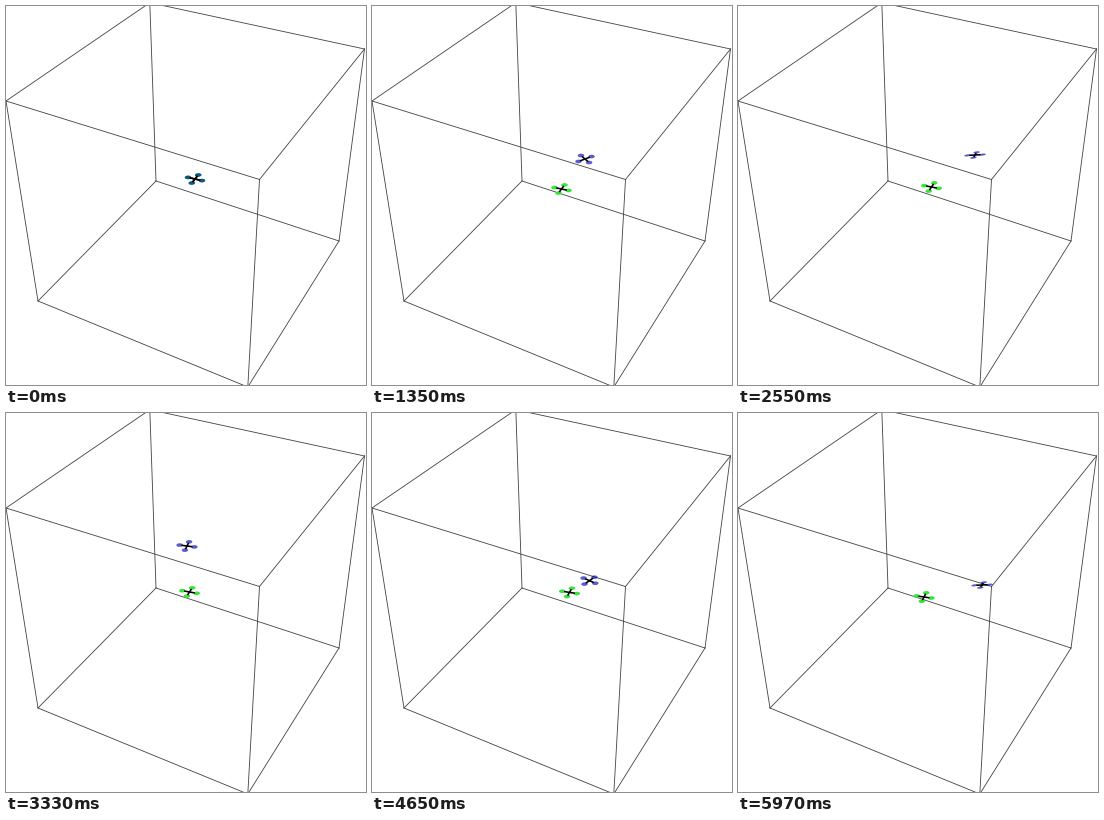
These frames come from a looping animation (360x379 px, 6000 ms). A matplotlib script:

```python
import numpy as np
import matplotlib.pyplot as plt
from matplotlib.animation import FuncAnimation
from matplotlib.patches import Polygon

W, H, DPI = 360, 379, 100
FRAMES, STEP = 200, 30

# Cube corners in stage pixels, both rings in the same order
TOP = [(143.8, -3.3), (358.5, 43), (253.5, 173.5), (0, 95)]
BOTTOM = [(150, 175), (333, 235), (241.8, 381), (32, 295)]

# Turning points of the flights: time (s), x, y
BLUE_PATH = [
    (0, 189, 173), (.63, 218, 174), (.9, 225, 165), (1.35, 213, 153),
    (1.87, 166, 144), (2.08, 178, 133), (2.55, 237, 149), (3.12, 168, 121),
    (3.33, 181, 133), (3.8, 211, 155), (4.11, 197, 163), (5.13, 241, 169),
    (5.55, 236, 173), (5.97, 244, 172)]
GREEN_PATH = [
    (0, 189, 173), (.6, 190, 183), (1.35, 189.5, 183), (2.55, 193.5, 181),
    (3.33, 183.5, 179), (4.11, 198.5, 176), (5.13, 193, 183), (5.97, 186, 184)]

# Projected half arms of a level drone
ARM_A, ARM_B = np.array([7, 1.6]), np.array([3.2, -4])
RING = np.linspace(0, 2 * np.pi, 32, endpoint=False)
ROTOR, SPAR = .42, .75


def px(n):
    return n * 72 / DPI


def spline(keys):
    """Smooth curve through rows of (time, values...)."""
    keys = np.array(keys, float)
    t, v = keys[:, 0], keys[:, 1:]
    m = np.gradient(v, t, axis=0)

    def at(s):
        i = int(np.clip(np.searchsorted(t, s, side="right") - 1, 0, len(t) - 2))
        d = t[i + 1] - t[i]
        u = np.clip((s - t[i]) / d, 0, 1)
        ease = u * u * (3 - 2 * u)
        return (v[i] + (v[i + 1] - v[i]) * ease
                + d * u * (1 - u) * (m[i] * (1 - u) - m[i + 1] * u))
    return at


def blue_pose(s):
    """Yaw in degrees, swinging in pulses, and forward lean from 0 to 1."""
    swing = .5 + .5 * np.cos(2 * np.pi * (s - 1.45) / 2.76)
    yaw = np.tanh(2 * s) * (48 * swing ** 2 - 13)
    lean = max(0, np.cos(2 * np.pi * (s - 2.55) / 3.42)) ** 2
    return yaw, lean


def green_pose(s):
    return -1.3 * s, 0


class Drone:
    def __init__(self, ax, path, pose, color, alpha, z):
        self.path, self.pose = spline(path), pose
        self.rotors = [ax.add_patch(Polygon([(0, 0)] * 3, fc=color, ec="none",
                                            alpha=alpha, zorder=z))
                       for _ in range(4)]
        self.spars = [ax.plot([], [], color="black", lw=px(1.6), zorder=z + 2,
                              solid_capstyle="butt")[0] for _ in range(2)]

    def move(self, s):
        center = self.path(s)
        yaw, lean = self.pose(s)
        c, n = np.cos(np.radians(yaw)), np.sin(np.radians(yaw))
        a = c * ARM_A - n * ARM_B - (0, 1.1 * lean)
        b = c * ARM_B + n * ARM_A + (0, 1.6 * lean)
        disc = ROTOR * (np.outer(np.cos(RING), a) + np.outer(np.sin(RING), b))
        for rotor, hub in zip(self.rotors, (a, -a, b, -b)):
            rotor.set_xy(center + hub + disc)
        for spar, v in zip(self.spars, (a, b)):
            spar.set_data(*np.array([center - SPAR * v, center + SPAR * v]).T)
        return self.rotors + self.spars


fig = plt.figure(figsize=(W / DPI, H / DPI), dpi=DPI, facecolor="white")
ax = fig.add_axes([0, 0, 1, 1])
ax.set(xlim=(0, W), ylim=(H, 0))
ax.axis("off")

for i in range(4):
    j = (i + 1) % 4
    for p, q in ((TOP[i], TOP[j]), (BOTTOM[i], BOTTOM[j]), (TOP[i], BOTTOM[i])):
        ax.plot(*zip(p, q), color="#444444", lw=px(.85), zorder=1)

drones = [Drone(ax, GREEN_PATH, green_pose, "#32e637", 1, 2),
          Drone(ax, BLUE_PATH, blue_pose, "#0000b4", .64, 3)]


def draw(i):
    s = i * STEP / 1000
    return [part for d in drones for part in d.move(s)]


anim = FuncAnimation(fig, draw, frames=FRAMES, interval=STEP, repeat=True,
                     repeat_delay=0, blit=False)
plt.show()
```
